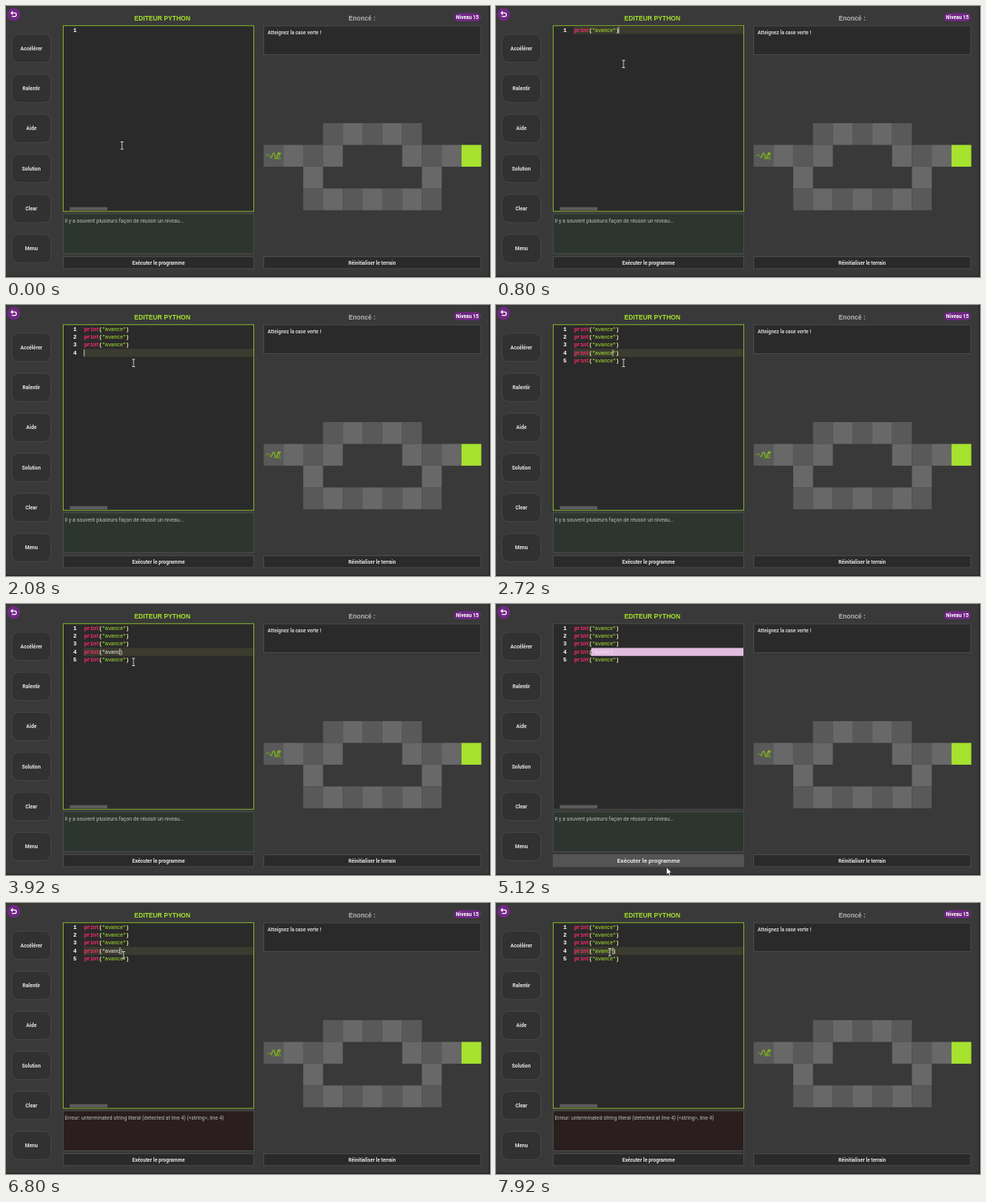
Write an HTML page that moves like this. It is 630x354 px and loops after 8 s.

```html
<!DOCTYPE html>
<html lang="fr">
<head>
<meta charset="utf-8">
<title>Editeur Python</title>
<style>
  html, body { margin: 0; width: 100%; height: 100%; overflow: hidden; background: #272426; }
  svg { display: block; width: 630px; height: 354px; font-family: Roboto, sans-serif; }
  text { white-space: pre; }
  .ui { font-size: 6.55px; font-weight: 700; fill: #e4e4e4; text-anchor: middle; }
  .title { font: 700 8.27px "Liberation Sans", sans-serif; text-anchor: middle; }
  .panel { fill: #2a2a2a; stroke: #4b4b4b; }
  .key { fill: #313131; stroke: #474747; }
  .code { font: 7px "Liberation Mono", monospace; letter-spacing: -.325px; }
  .num { font-size: 7.5px; font-weight: 700; fill: #fff; }
  .kw { fill: #f92a6c; font-weight: 700; }
  .par { fill: #f6f0a8; font-weight: 700; }
  .str { fill: #a9e532; }
  .plain { fill: #ededE6; }
  .picked { fill: #f6e6f4; }
  #console { font-size: 6.8px; fill: #bcbfbc; }
</style>
</head>
<body>
<svg id="stage" viewBox="0 0 630 354">
  <rect width="630" height="354" fill="#272426"/>
  <rect width="628.5" height="352.7" rx="2.5" fill="#393939"/>

  <circle cx="10" cy="11" r="8.5" fill="#6f2882"/>
  <path d="M7 9.200H11.300A2.200 2.200 0 0 1 11.300 13.600H7.600M8.800 7 6.700 9.200 8.800 11.400" fill="none" stroke="#fff" stroke-width="1.2"/>
  <rect x="583.3" y="9.2" width="34.7" height="10.8" rx="5.4" fill="#6f2882"/>
  <text x="600.5" y="17" class="ui" style="font-size:6.5px;fill:#fff">Niveau 15</text>
  <text x="203.5" y="18.8" class="title" fill="#a6e22e">EDITEUR PYTHON</text>
  <text x="463.5" y="18.8" class="title" fill="#b4b4b4">Enoncé :</text>

  <g id="menu"></g>

  <rect id="editor" class="panel" x="74.5" y="25.7" width="248" height="242.5"/>
  <rect x="83" y="262.700" width="49" height="4.300" fill="#5b5b5b"/>
  <rect id="band" x="101" width="221" height="10.4"/>
  <g id="code" class="code"></g>
  <path id="caret" d="M0 0V9" stroke="#fff" stroke-width=".7"/>

  <rect id="output" x="74.5" y="271.5" width="248" height="52" stroke="#4b4b4b"/>
  <text id="console" x="76.5" y="282.5"></text>
  <rect id="run" class="panel" x="74.5" y="327.5" width="248" height="15.5"/>
  <text id="runLabel" class="ui" x="198.5" y="338.3">Exécuter le programme</text>

  <rect class="panel" x="335.5" y="26" width="282.5" height="37.5"/>
  <text x="340.5" y="36.800" class="ui" style="font-size:6.45px;text-anchor:start;fill:#d0d0d0">Atteignez la case verte !</text>
  <rect class="panel" x="335.5" y="327.5" width="282.5" height="15.5"/>
  <text class="ui" x="476.5" y="338.3" style="font-size:6.4px">Réinitialiser le terrain</text>

  <g id="board"></g>
  <g fill="none" stroke="#7fae24" stroke-linecap="round" stroke-linejoin="round">
    <path id="tail" stroke="#6b9720" stroke-width="1.1"/>
    <path d="M345 198C347 197.500 346 192.500 348.300 192.200S349.500 199 351.500 199 352.500 193 355 192.500" stroke-width="1.5"/>
    <path d="M349.500 199.500H357.500M354 193.500 356.500 196.500 353.500 198.500" stroke="#6b9720" stroke-width="1.3"/>
    <ellipse cx="355.800" cy="192.600" rx="2" ry="1.500" fill="#95cc28" stroke="none"/>
    <circle cx="356.300" cy="192.200" r=".6" fill="#26330c" stroke="none"/>
  </g>

  <path id="beam" d="M-2-4.500H2M-2 5H2M0-4.500V5" stroke="#dcdcdc" stroke-width=".9" fill="none"/>
  <path id="arrow" d="M0 0V9.500L2.200 7.600 3.700 10.600 5.200 9.900 3.800 7H6.600Z" fill="#fff" stroke="#222" stroke-width=".6"/>
</svg>
<script>
const LOOP = 8000, TICK = 80;
const CHAR = 3.875, LEFT = 101.7, TOP = 26.2, PITCH = 10.4;
const CALL = 'print("avance")';
const HINT = 'Il y a souvent plusieurs façon de réussir un niveau...';
const ERROR = 'Erreur: unterminated string literal (detected at line 4) (<string>, line 4)';
const BLUR = 5040, FAIL = 5280, REFOCUS = 6400;

const $ = id => document.getElementById(id);
const set = (id, attrs) => {
  for (const k in attrs) $(id).setAttribute(k, attrs[k]);
};
const show = (id, on) => { $(id).style.display = on ? '' : 'none'; };
const rowY = r => TOP + r * PITCH;

// Menu buttons
$('menu').innerHTML = ['Accélérer', 'Ralentir', 'Aide', 'Solution', 'Clear', 'Menu'].map((label, i) => {
  const y = 55.3 + i * 52.3;
  return `<rect class="key" x="7.5" y="${y - 18.5}" width="51" height="37" rx="9"/>
    <text class="ui" x="33" y="${y + 2.4}">${label}</text>`;
}).join('');

// Board: each run is row, first column, last column
const CELL_W = 25.75, CELL_H = 28.45;
const runs = [[0, 3, 7], [1, 0, 3], [1, 7, 10], [2, 2, 2], [2, 8, 8], [3, 2, 8]];
$('board').innerHTML = runs.map(([r, a, b]) => {
  let cells = '';
  for (let c = a; c <= b; c++) {
    const fill = c === 10 ? '#a6e22e' : (r + c) % 2 ? '#595959' : '#686868';
    cells += `<rect x="${335.4 + c * CELL_W}" y="${153 + r * CELL_H}" width="${CELL_W}" height="${CELL_H}" fill="${fill}"/>`;
  }
  return cells;
}).join('');

// Edits: time, lines, caret row, caret column
const rep = (n, last) => Array(n).fill(CALL).concat(last ?? []);
const withFourth = s => [CALL, CALL, CALL, s, CALL];
const edits = [
  [0, [''], -1, 0],
  [640, rep(1), 0, 15],
  [1040, rep(1, ''), 1, 0],
  [1360, rep(2), 1, 15],
  [1760, rep(2, ''), 2, 0],
  [1920, rep(3), 2, 15],
  [2000, rep(3, ''), 3, 0],
  [2160, rep(4), 3, 15],
  [2240, rep(4, ''), 4, 0],
  [2400, rep(5), 4, 15],
  [2560, rep(5), 3, 15],
  [2640, rep(5), 3, 14],
  [2720, rep(5), 3, 13],
  [3040, withFourth('print("avance)'), 3, 13],
  [3440, withFourth('print("avanc)'), 3, 12],
  [7360, withFourth('print("avanc")'), 3, 13]
];

// Pointer: time, x, y
const moves = [
  [80, 151, 182], [720, 166, 75.5], [4400, 166, 75.5], [5040, 222, 344],
  [5600, 222, 344], [6000, 191, 318], [6320, 153, 68], [6960, 153, 68], [7280, 148, 64]
];

function pointer(t) {
  const i = moves.findIndex(m => m[0] > t);
  if (i < 1) return (i ? moves[moves.length - 1] : moves[0]).slice(1);
  const [t0, x0, y0] = moves[i - 1], [t1, x1, y1] = moves[i];
  const u = (t - t0) / (t1 - t0), k = u * u * (3 - 2 * u);
  return [x0 + (x1 - x0) * k, y0 + (y1 - y0) * k];
}

function codeLine(s, r, picked) {
  const y = rowY(r) + 7.4;
  const put = (col, cls, str) =>
    `<text class="${cls}" x="${LEFT + col * CHAR}" y="${y}">${str}</text>`;
  const num = `<text class="num" x="87.5" y="${y}">${r + 1}</text>`;
  if (!s) return num;
  const head = num + put(0, 'kw', 'print') + put(5, 'par', '(');
  return head + (s.endsWith('")')
    ? put(6, 'str', s.slice(6, -1)) + put(s.length - 1, 'par', ')')
    : put(6, picked ? 'picked' : 'plain', s.slice(6)));
}

let lastKey = '';
function draw(t) {
  const [at, lines, row, col] = edits.filter(e => e[0] <= t).pop();
  const focus = t < BLUR || t >= REFOCUS;
  const failed = t >= FAIL;

  const key = at + '|' + focus;
  if (key !== lastKey) {
    lastKey = key;
    $('code').innerHTML = lines.map((s, r) => codeLine(s, r, !focus)).join('');
  }

  const x0 = focus ? 101 : LEFT + 6 * CHAR - 1;
  show('band', row >= 0);
  set('band', { x: x0, width: 322 - x0, y: rowY(Math.max(row, 0)), fill: focus ? '#3b3b2f' : '#e2bce0' });
  set('editor', { style: `stroke:${focus ? '#86b22f' : '#4b4b4b'}` });

  const since = t - (t >= REFOCUS ? Math.max(at, REFOCUS) : at);
  show('caret', focus && row >= 0 && since % 900 < 600);
  set('caret', { transform: `translate(${LEFT + col * CHAR} ${rowY(row) + 0.7})` });

  set('output', { fill: failed ? '#2a1e1e' : '#2c362f' });
  $('console').textContent = failed ? ERROR : HINT;

  const [px, py] = pointer(t);
  const inX = px > 74 && px < 323;
  const text = inX && (py > 25 && py < 268 || py > 271 && py < 323.5);
  const hover = inX && py > 327 && py < 345;
  set('run', { style: hover ? 'fill:#545454;stroke:#545454' : '' });
  set('runLabel', { style: hover ? 'font-size:7.85px' : '' });
  show('beam', text);
  show('arrow', !text);
  set(text ? 'beam' : 'arrow', { transform: `translate(${px} ${py})` });

  set('tail', { d: t < 4400 ? 'M338.500 196C341 193 342 194 343 196S344 198 345 198'
                            : 'M341 197.500C342 194.500 343.500 196 345 198' });
}

function frame(now) {
  draw(Math.floor(now % LOOP / TICK) * TICK);
  requestAnimationFrame(frame);
}
draw(0);
requestAnimationFrame(frame);
</script>
</body>
</html>
```
